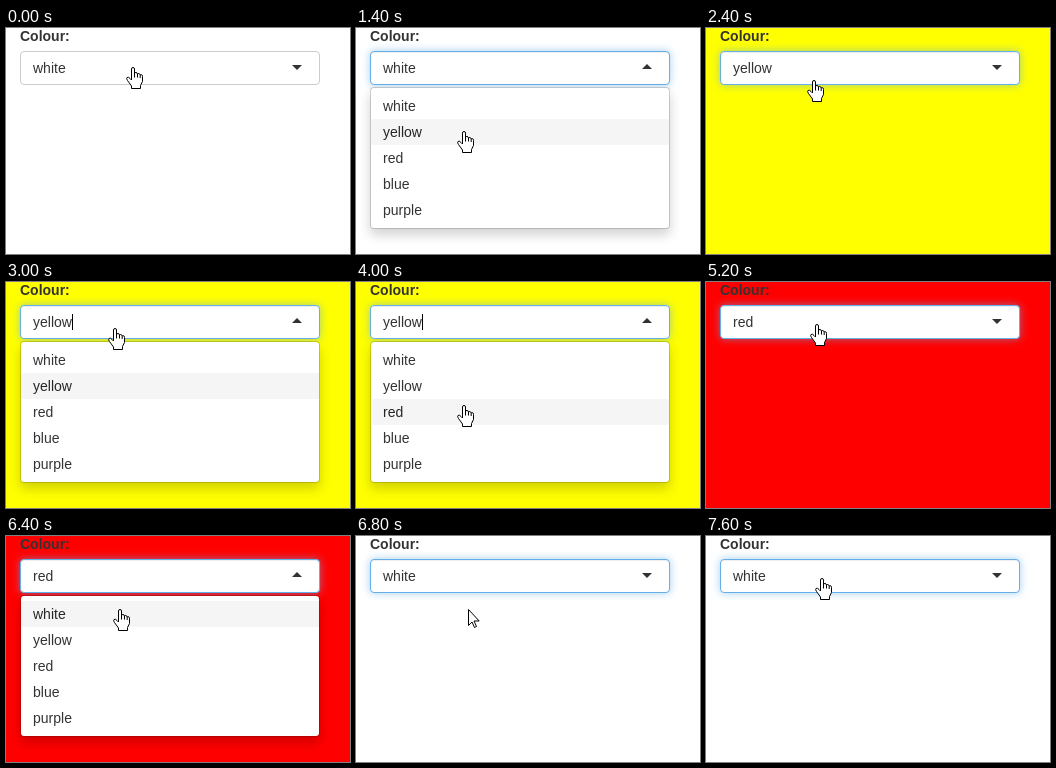
An HTML page for the animation above (8400 ms loop, 344 by 226 pixels).

```html
<!DOCTYPE html>
<html lang="en">
<head>
<meta charset="utf-8">
<title>Colour select</title>
<style>
  html, body { margin: 0; width: 100%; height: 100%; overflow: hidden; }
  body { position: relative; font: 14px/20px "Liberation Sans", Arial, sans-serif; color: #333; }
  body > * { position: absolute; box-sizing: border-box; }
  label { left: 14px; top: -2px; font-weight: bold; }
  #select {
    left: 14px; top: 23px; width: 300px; height: 34px; padding: 6px 12px;
    background: #fff; border: 1px solid #ccc; border-radius: 4px;
  }
  #select.focus {
    border-color: #66afe9;
    box-shadow: inset 0 1px 1px rgba(0,0,0,.075), 0 0 8px rgba(102,175,233,.6);
  }
  #select::after {
    content: ""; position: absolute; right: 17px; top: 13px;
    border: solid transparent; border-width: 5px 5px 0; border-top-color: #333;
  }
  #select.open::after { top: 12px; border-width: 0 5px 5px; border-bottom-color: #333; }
  #caret { display: inline-block; width: 1px; height: 16px; background: #000; vertical-align: -3px; }
  #menu {
    left: 14px; top: 59px; width: 300px; padding: 5px 0;
    background: #fff; background-clip: padding-box;
    border: 1px solid rgba(0,0,0,.16); border-radius: 4px;
    box-shadow: 0 6px 12px rgba(0,0,0,.175);
  }
  #menu div { padding: 3px 12px; }
  #menu .active { background: #f5f5f5; color: #262626; }
  svg { left: 0; top: 0; width: 17px; height: 22px; overflow: visible; fill: #fff; stroke: #000; stroke-linejoin: round; }
</style>
</head>
<body>
<label>Colour:</label>
<div id="select"><span id="value"></span><span id="caret"></span></div>
<div id="menu"></div>
<svg id="cursor">
  <g id="hand">
    <path d="M5.5 13V2Q5.5 .5 7 .5T8.5 2V6.5Q8.7 5.5 10 5.5T11.5 7Q11.8 6.5 12.8 6.5T14.2 8Q14.5 7.6 15.2 7.6 16.5 7.6 16.5 9.5V14.5L14.5 18.5V21.5H5.5V19L1.5 13.5Q0 11.5 1 10.5 2.5 9.5 4 11.5Z"/>
    <path d="M8.5 6V10.5M11.5 7V10.5M14.2 8V11" fill="none"/>
  </g>
  <path id="arrow" d="M5.5 .5V16.5L9 13 11.5 18.5 13.5 17.5 11 12H16.2Z"/>
</svg>
<script>
const LOOP = 8400, STEP = 200, BLINK = 530;
const colours = ['white', 'yellow', 'red', 'blue', 'purple'];
const picks = [[0, 'white'], [1600, 'yellow'], [4200, 'red'], [6800, 'white']];
const openings = [[600, 1600], [2800, 4200], [5400, 6800]];
// Pointer waypoints: time, x, y
const path = [
  [0, 120, 39], [600, 120, 39], [1400, 101, 103], [1800, 101, 103], [2400, 101, 52],
  [2800, 102, 30], [4000, 101, 123], [4200, 100, 124], [4400, 100, 123], [4600, 100, 123],
  [5200, 104, 42], [5600, 104, 42], [6400, 107, 73], [6800, 107, 73],
  [7400, 107, 44], [7600, 109, 42], [LOOP, 109, 42]
];

const el = id => document.getElementById(id);
const show = (id, on) => { el(id).style.display = on ? '' : 'none'; };

const options = colours.map(name => {
  const option = document.createElement('div');
  option.textContent = name;
  return el('menu').appendChild(option);
});

function pointerAt(t) {
  const i = path.findIndex(p => p[0] > t);
  const [t0, x0, y0] = path[i - 1], [t1, x1, y1] = path[i];
  const u = (t - t0) / (t1 - t0);
  return [Math.round(x0 + (x1 - x0) * u), Math.round(y0 + (y1 - y0) * u)];
}

function render(t) {
  const value = picks.filter(p => p[0] <= t).pop()[1];
  const opening = openings.find(([from, to]) => t >= from && t < to);
  const [x, y] = pointerAt(t);

  document.body.style.background = value;
  el('value').textContent = value;
  el('select').className = (t >= 600 ? 'focus ' : '') + (opening ? 'open' : '');
  show('menu', opening);
  show('caret', opening && (t - opening[0]) % (2 * BLINK) < BLINK);

  const row = Math.floor((y - 65) / 26);
  const active = row >= 0 ? row : colours.indexOf(value);
  options.forEach((option, i) => option.classList.toggle('active', i === active));

  const overControl = opening || y < 57;
  show('hand', overControl);
  show('arrow', !overControl);
  el('cursor').style.transform = `translate(${x}px, ${y}px)`;
}

const start = performance.now();
function tick() {
  const t = (performance.now() - start) % LOOP;
  render(Math.floor(t / STEP) * STEP);
  requestAnimationFrame(tick);
}
tick();
</script>
</body>
</html>
```
